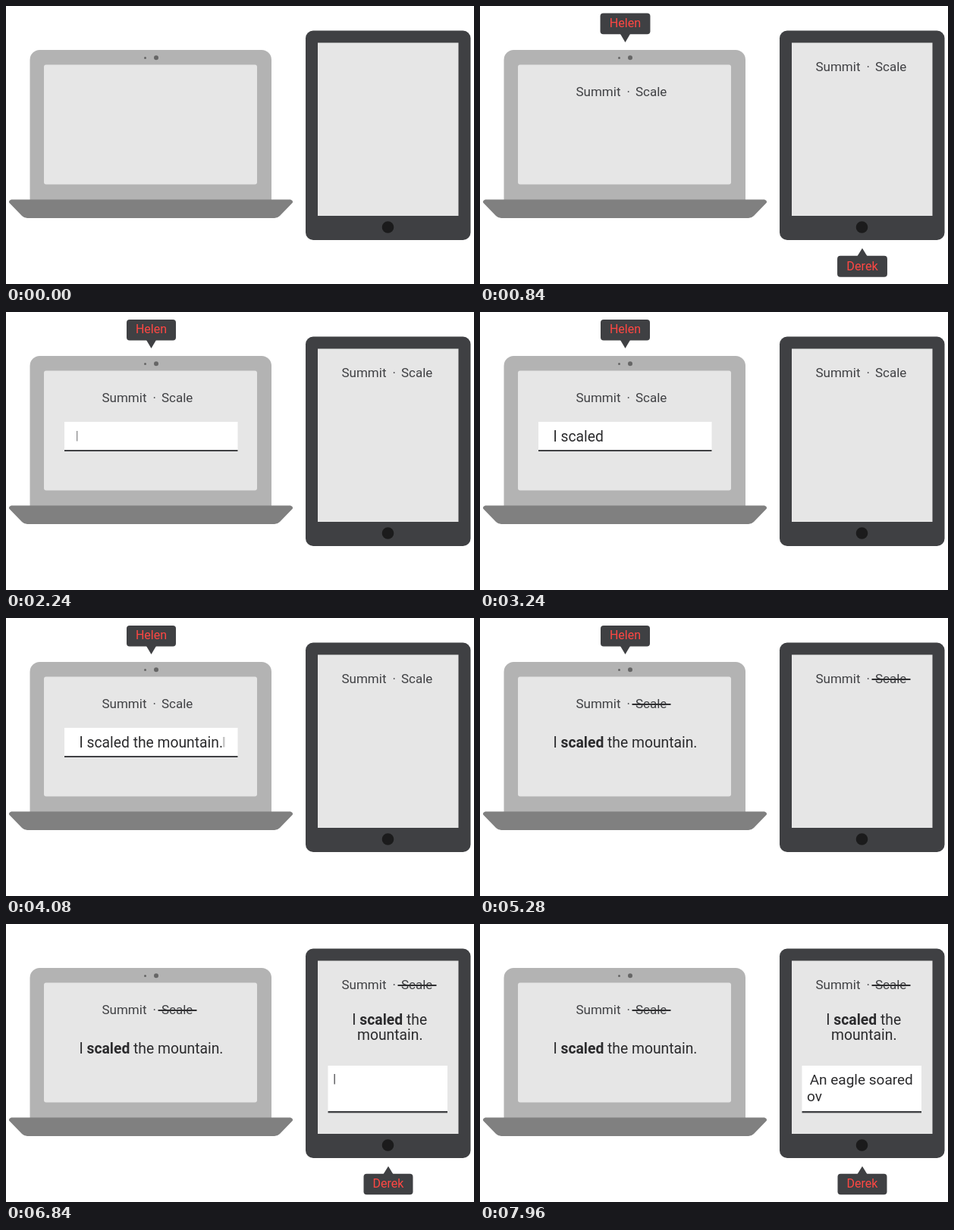
Animation of 617x367 px, one loop 8 s. Source, as an HTML page:

```html
<!DOCTYPE html>
<html lang="en">
<head>
<meta charset="utf-8">
<style>
  html, body { margin: 0; width: 100%; height: 100%; overflow: hidden; background: #fff; }
  svg { display: block; }
  text { font-family: Roboto, sans-serif; font-size: 19.3px; fill: #2b2b2d; white-space: pre; }
  .title text { font-size: 17px; fill: #404144; }
  .title path { stroke: #2f2f31; stroke-width: 2; }
  .tag text { font-size: 16px; fill: #ff4743; text-anchor: middle; }
  .dark { fill: #3f4043; }
  .screen { fill: #e6e6e6; }
  .bold { font-weight: 700; }
</style>
</head>
<body>
<svg width="617" height="367" viewBox="0 0 617 367">
  <!-- laptop -->
  <path fill="#b3b3b3" d="M31.5 257V71a13 13 0 0 1 13-13H337a13 13 0 0 1 13 13V257z"/>
  <rect class="screen" x="50" y="77.5" width="281" height="158" rx="3"/>
  <circle cx="183.5" cy="68.5" r="1.5" fill="#666"/>
  <circle cx="198" cy="68.3" r="3" fill="#666"/>
  <path fill="#808080" d="M7 255.5H375q5 2 2 5L361 277q-3 3-7 3H28q-4 0-7-3L5 260.5q-3-3 2-5z"/>
  <!-- tablet -->
  <rect class="dark" x="395" y="32.5" width="217.5" height="276.5" rx="10"/>
  <rect class="screen" x="411" y="48.5" width="185.5" height="228.5"/>
  <circle cx="503.5" cy="292" r="7.8" fill="#1b1b1c"/>

  <g class="title" transform="translate(126.5 118.7)">
    <text>Summit</text><text x="67">·</text><text x="78.5">Scale</text><path/>
  </g>
  <g class="title" transform="translate(442.5 85.7)">
    <text>Summit</text><text x="67">·</text><text x="78.5">Scale</text><path/>
  </g>

  <g id="laptopField">
    <rect x="77" y="145" width="228.5" height="39" fill="#fff"/>
    <rect class="dark" x="77" y="182" width="228.5" height="2"/>
  </g>
  <rect id="startCursor" class="dark" x="93" y="157" width="1.3" height="13.5"/>
  <rect id="endCursor" x="286" y="157" width="2.5" height="13.5" fill="#555"/>
  <text id="typed" x="96.5" y="170.5"></text>
  <text id="marked" x="96.5" y="170.5">I <tspan class="bold">scaled</tspan> the mountain.</text>

  <g id="received">
    <text x="456.3" y="132.7"></text>
    <text x="463" y="152.7"></text>
  </g>

  <g id="tabletField">
    <rect x="424.5" y="187" width="157.5" height="62.5" fill="#fff"/>
    <rect class="dark" x="424.5" y="247" width="157.5" height="2.4"/>
  </g>
  <rect id="tabletCursor" class="dark" x="432.5" y="198" width="1.3" height="13.5"/>
  <text id="reply1" x="434.7" y="211.5" style="font-size:19px"></text>
  <text id="reply2" x="431" y="233.5" style="font-size:19px"></text>

  <g id="topTag" class="tag">
    <rect class="dark" x="-32.5" y="-38" width="65" height="27.5" rx="4"/>
    <path class="dark" d="M-6.5-11H6.5L0 0z"/>
    <text y="-20">Helen</text>
  </g>
  <g id="bottomTag" class="tag">
    <rect class="dark" x="-32.5" y="10" width="65" height="27.5" rx="4"/>
    <path class="dark" d="M-6.5 10.5H6.5L0 0z"/>
    <text y="28.7">Derek</text>
  </g>
</svg>
<script>
const LOOP = 8000, STEP = 40;
const $ = id => document.getElementById(id);
const titles = document.querySelectorAll('.title');
const strikes = document.querySelectorAll('.title path');

const ramp = (t, from, to) => Math.min(1, Math.max(0, (t - from) / (to - from)));
const easeOut = p => 1 - (1 - p) ** 3;
const fade = (el, alpha) => el.setAttribute('opacity', alpha);
const typedCount = (t, start, perChar) => Math.max(0, Math.floor((t - start) / perChar));

// Damped spring that starts at 0 and settles at 1
function spring(ms) {
  const s = ms / 1000;
  return ms <= 0 ? 0 : 1 - Math.exp(-7.5 * s) * Math.cos(11.5 * s);
}

function showTag(el, x, y, t, start, end) {
  el.setAttribute('transform', `translate(${x} ${y}) scale(${spring(t - start)})`);
  fade(el, ramp(t, start, start + 80) * (1 - ramp(t, end, end + 120)));
}

const SENTENCE = 'I scaled the mountain.';
const REPLY = ['An eagle soared', 'over'];
const BREAK = 13;
const [line1, line2] = $('received').children;
const letters = [...SENTENCE].map((char, i) => {
  const span = document.createElementNS('http://www.w3.org/2000/svg', 'tspan');
  span.textContent = char;
  if (i > 1 && i < 8) span.setAttribute('class', 'bold');
  (i < BREAK ? line1 : line2).append(span);
  return span;
});

function draw(t) {
  const strike = ramp(t, 5040, 5280);
  titles.forEach(el => fade(el, ramp(t, 205, 440)));
  strikes.forEach(el => el.setAttribute('d', strike ? `M74-4.7h${51 * strike}` : ''));

  showTag($('topTag'), 191.5, 48, t, 700, 5660);
  const again = t >= 5000;
  showTag($('bottomTag'), 504, 319.7, t, again ? 5700 : 700, again ? LOOP : 1900);

  const leave = ramp(t, 4640, 4800);
  fade($('laptopField'), ramp(t, 2020, 2240) * (1 - leave));
  fade($('startCursor'), t < 2840 ? easeOut(ramp(t, 2110, 2600)) : 0);
  fade($('endCursor'), easeOut(ramp(t, 4040, 4360)) * (1 - leave));
  $('typed').textContent = SENTENCE.slice(0, typedCount(t, 2786, 54));
  fade($('typed'), leave < 1 ? 1 : 0);
  fade($('marked'), leave);

  letters.forEach((el, i) => {
    const start = 5910 + 10 * i;
    el.setAttribute('fill-opacity', ramp(t, start, start + 180) ** 2);
  });

  fade($('tabletField'), ramp(t, 6460, 6680));
  fade($('tabletCursor'), t < 7360 ? easeOut(ramp(t, 6550, 7040)) : 0);
  const count = typedCount(t, 7325, 35);
  $('reply1').textContent = REPLY[0].slice(0, count);
  // The line break takes the place of one typed space
  $('reply2').textContent = REPLY[1].slice(0, Math.max(0, count - REPLY[0].length - 1));
}

const origin = performance.now();
function tick() {
  const t = (performance.now() - origin) % LOOP;
  draw(Math.floor(t / STEP) * STEP);
  requestAnimationFrame(tick);
}
tick();
</script>
</body>
</html>
```
